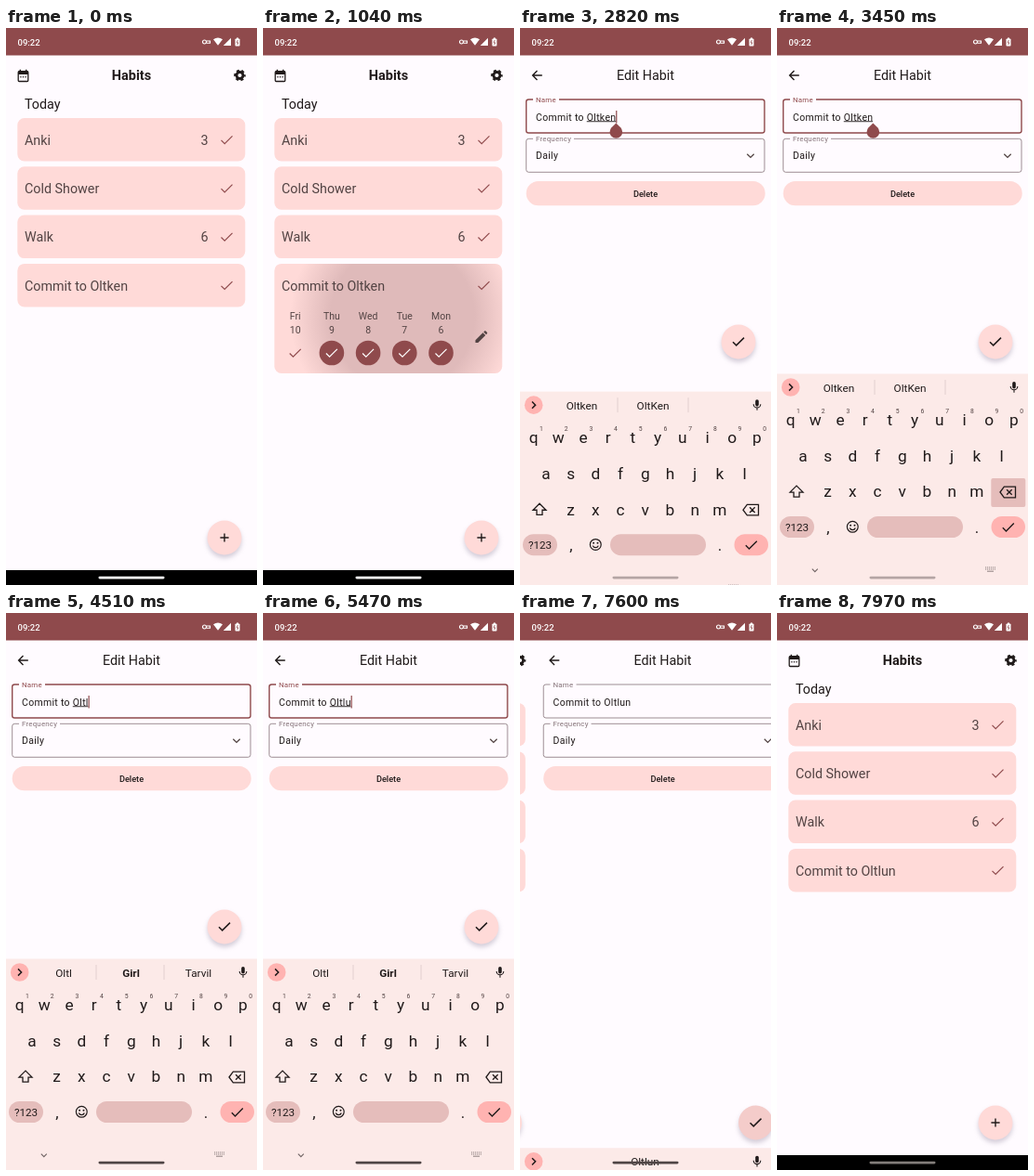
Animation, 270 px wide and 600 px high, one loop 7990 ms. Source, as an HTML page:

```html
<!DOCTYPE html>
<html lang="en">
<head>
<meta charset="utf-8">
<title>Habit tracker</title>
<style>
html, body { margin: 0; width: 100%; height: 100%; overflow: hidden; background: #fffbff; }
svg { display: block; width: 100vw; height: 100vh; }
text { font-family: Roboto, "Noto Sans", sans-serif; white-space: pre; }
.line { fill: none; stroke-linecap: butt; stroke-linejoin: miter; }
</style>
</head>
<body>
<svg id="stage" viewBox="0 0 270 600"></svg>
<script>
const LOOP = 7990;
const C = {
  page: '#fffbff', bar: '#8f4a4c', card: '#ffdad8', ink: '#201a1a', text: '#524343',
  outline: '#857378', keys: '#fceae8', pink: '#e5bdbb', coral: '#ffb3b1', light: '#ffffff', shadow: '#aaa0b4'
};
const OLD = 'Oltken', NEW = 'Oltlun';

const text = (x, cy, size, str, { fill = C.ink, anchor = 'start', weight = 400, extra = '' } = {}) =>
  `<text x="${x}" y="${cy + size * .355}" font-size="${size}" fill="${fill}" text-anchor="${anchor}" font-weight="${weight}" ${extra}>${str}</text>`;
const mid = (x, cy, size, str, opts = {}) => text(x, cy, size, str, { ...opts, anchor: 'middle' });
const rect = (x, y, w, h, r, fill, extra = '') =>
  `<rect x="${x}" y="${y}" width="${w}" height="${h}" rx="${r}" fill="${fill}" ${extra}/>`;
const line = (d, color = C.ink, width = 1.4, extra = '') =>
  `<path class="line" d="${d}" stroke="${color}" stroke-width="${width}" ${extra}/>`;
const at = (x, y, content, id = '') => `<g ${id && `id="${id}"`} transform="translate(${x} ${y})">${content}</g>`;
const disc = (r, fill, extra = '') => `<circle r="${r}" fill="${fill}" ${extra}/>`;
const check = (x, y, color = C.bar, width = 1.2) => at(x, y, line('M-6 .2L-2.3 3.9L6 -4.4', color, width));

// Icons, centred on their own origin
const gear = disc(3.5, 'none', `stroke="${C.ink}" stroke-width="2.8"`) +
  disc(5.2, 'none', `stroke="${C.ink}" stroke-width="2.2" stroke-dasharray="2.9 2.545" stroke-dashoffset="1.45"`);
const calendar = rect(-5.3, -4.8, 10.6, 10.8, 1, 'none', `stroke="${C.ink}" stroke-width="1.3"`) +
  rect(-5.5, -5, 11, 3.4, .6, C.ink) + line('M-3.2 -6.8v2.5M3.2 -6.8v2.5') +
  [-2.6, 0, 2.6].map(x => rect(x - .65, .6, 1.3, 1.3, 0, C.ink)).join('');
const arrow = line('M5.3 0H-4.4M0 -4.9L-4.9 0L0 4.9');
const pencil = `<path d="M-6 6V3.2L2 -4.8L4.8 -2L-3.2 6ZM2.8 -5.6L4 -6.7Q4.6 -7 5.2 -6.5L6.6 -5Q7 -4.4 6.6 -3.9L5.6 -2.8Z" fill="${C.text}"/>`;
const fab = (icon, id) => at(235, 549,
  disc(18.5, C.shadow, 'cy="3.5" opacity=".5" filter="url(#soft)"') + disc(18.5, C.card) +
  disc(18.5, C.bar, 'class="tap" opacity="0"') + icon, id);

const statusBar = rect(0, 0, 270, 29.5, 0, C.bar) +
  text(12.5, 15.5, 9.5, '09:22', { fill: C.light, weight: 500 }) +
  at(213.5, 15, disc(2, 'none', `stroke="${C.light}" stroke-width="1.2"`) + line('M2 -1H6V1.2H2', C.light, 1.1)) +
  `<g fill="${C.light}"><path d="M223 12.3Q228 8.6 233 12.3L228 18.8Z"/><path d="M234 19V18.7L242 10.8V19Z"/></g>` +
  rect(246.5, 11.5, 5, 8, .8, C.light) + rect(248, 10.5, 2, 1.5, 0, C.light) + line('M249.3 13L248.2 15.8H249.8L248.8 18', C.bar, .8);

const habits = [['Anki', 3], ['Cold Shower', ''], ['Walk', 6], ['', '']];
const cardTop = i => 97 + i * 52.3;
const card = ([name, count], i) => {
  const y = cardTop(i), cy = y + 23.7, last = i === 3;
  return rect(12.3, y, 245, 46.5, 7.5, C.card, last ? 'id="lastCard"' : '') +
    (last ? '<g clip-path="url(#cardClip)"><circle id="ripple" cx="150" cy="311" fill="url(#glow)"/></g>' : '') +
    text(20, cy, 14.3, name, { fill: C.text, extra: last ? 'id="lastName"' : '' }) +
    mid(213.5, cy, 14.3, count, { fill: C.text }) + check(237.5, cy);
};
const days = ['Fri', 'Thu', 'Wed', 'Tue', 'Mon'].map((day, i) => {
  const x = 34.7 + i * 39.2, opts = { fill: C.text };
  return mid(x, 310, 10.5, day, opts) + mid(x, 325.5, 10.5, 10 - i, opts) +
    (i ? at(x, 350, disc(13.3, C.bar)) : '') + check(x, 350.3, i ? C.light : C.bar);
}).join('');

const home = rect(0, 29, 270, 555, 0, C.page) + at(18.5, 51.5, calendar) +
  mid(135, 51, 14.5, 'Habits', { weight: 700 }) + at(251.5, 51, gear) +
  text(20, 82, 14.3, 'Today') + habits.map(card).join('') +
  `<g id="details">${days}${at(234.5, 333, disc(16, C.bar, 'id="editTap" opacity="0"') + pencil)}</g>` +
  fab(line('M-4.6 0H4.6M0 -4.6V4.6'), 'homeFab');

const field = (y, label, labelWidth, id) =>
  rect(6.7, y, 256.3, 36, 2.6, C.page, `id="${id}" stroke="${C.outline}" stroke-width=".8"`) +
  rect(14, y - 3, labelWidth + 6, 6, 0, C.page) +
  text(17, y, 7.9, label, { fill: C.outline, extra: `id="${id}Label" letter-spacing=".2"` });

const edit = rect(0, 29, 270, 555, 0, C.page) + at(18.5, 51, arrow) +
  mid(135, 51, 14.3, 'Edit Habit') +
  field(77, 'Name', 22, 'name') + text(17, 96, 10.5, '', { extra: 'id="input" letter-spacing=".3"' }) +
  rect(0, 100.3, 0, .9, 0, C.ink, 'id="underline"') + rect(0, 89, 1.2, 13.5, 0, C.bar, 'id="caret"') +
  `<path id="handle" d="M0 102.5L4.9 107.3A6.8 6.8 0 1 1 -4.9 107.3Z" fill="${C.bar}"/>` +
  field(119.3, 'Frequency', 38, 'freq') + text(17, 137, 10.5, 'Daily', { extra: 'letter-spacing=".3"' }) +
  line('M244.3 135.7L248 139.4L251.7 135.7', C.text, 1.3) +
  rect(6.7, 165, 257, 26.3, 13.1, C.card) + mid(135, 178.3, 9.2, 'Delete', { weight: 500 }) +
  fab(line('M-6 .2L-2.3 3.9L6 -4.4', C.ink, 1.5), 'saveFab');

const keyX = (col, shift) => 14.6 + 26.7 * (col + shift);
const keyRow = (letters, y, shift) => [...letters].map((k, i) => mid(keyX(i, shift), y, 17.3, k)).join('');
const keyboard = rect(0, 372.5, 270, 228, 0, C.keys) +
  at(14.7, 387, disc(9.8, C.coral) + line('M-1.7 -3.6L1.9 0L-1.7 3.6', C.ink, 1.5)) +
  '<g id="suggestions"></g>' +
  at(255, 387, rect(-1.8, -6, 3.6, 7.5, 1.8, C.ink) + line('M-3.8 -1A3.8 3.8 0 0 0 3.8 -1M0 3V5.7', C.ink, 1.1)) +
  '<g id="pressed"></g>' +
  keyRow('qwertyuiop', 422, 0) + keyRow('asdfghjkl', 461, .5) + keyRow('zxcvbnm', 499.3, 1.5) +
  [...'1234567890'].map((n, i) => mid(keyX(i, 0) + 8.3, 412.5, 6.8, n, { fill: C.text })).join('') +
  at(21, 499.5, line('M0 -6.4L-7 .6H-3V5.7H3V.6H7Z', C.ink, 1.3)) +
  at(248.5, 500, line('M-8.5 0L-4.2 -5.8H8V5.8H-4.2ZM-1.4 -2.8L4.2 2.8M4.2 -2.8L-1.4 2.8', C.ink, 1.3)) +
  rect(3, 526, 37, 23, 11.5, C.pink) + mid(21.5, 537.7, 11.7, '?123') +
  mid(55, 538, 17, ',') + mid(215, 538, 17, '.') +
  at(81.3, 537.3, disc(5.9, 'none', `stroke="${C.ink}" stroke-width="1.2"`) +
    disc(1, C.ink, 'cx="-2.2" cy="-1.6"') + disc(1, C.ink, 'cx="2.2" cy="-1.6"') + line('M-3 1.2A3.2 3.2 0 0 0 3 1.2', C.ink, 1.3)) +
  rect(97, 526, 103, 23, 11.5, C.pink) + rect(230.5, 526, 36.5, 23, 11.5, C.coral) + check(248.8, 538, C.ink, 1.4) +
  line('M37.8 582.6L40.8 585.6L43.8 582.6', '#6f6363', 1.1) +
  line('M224 581H235M224 583H235', '#8d8080', 1, 'stroke-dasharray="1.2 .8"') + line('M226 585.2H233', '#8d8080', 1);

document.getElementById('stage').innerHTML = `
  <defs>
    <filter id="soft" x="-50%" y="-50%" width="200%" height="200%"><feGaussianBlur stdDeviation="2.6"/></filter>
    <clipPath id="cardClip">${rect(12.3, cardTop(3), 245, 46.5, 7.5, '#000', 'id="clipRect"')}</clipPath>
    <radialGradient id="glow"><stop offset=".64" stop-color="#dfbaba"/>
      <stop offset="1" stop-color="#dfbaba" stop-opacity="0"/></radialGradient>
  </defs>
  <rect width="270" height="600" fill="${C.page}"/>
  <g id="home">${home}</g><g id="edit">${edit}</g>
  ${statusBar}${rect(0, 584, 270, 16, 0, '#000')}
  <g id="keyboard">${keyboard}</g>${rect(99.5, 590.8, 71, 2.6, 1.3, C.light, 'id="pill"')}`;

const $ = Object.fromEntries([...document.querySelectorAll('[id]')].map(el => [el.id, el]));
const set = (el, attrs) => { for (const k in attrs) el.setAttribute(k, attrs[k]); };
const show = (el, on) => set(el, { visibility: on ? 'visible' : 'hidden' });

// Each table row starts at its first value, in milliseconds
const words = [[0, OLD], [3480, 'Oltke'], [3700, 'Oltk'], [3920, 'Olt'], [4250, 'Oltl'], [5210, 'Oltlu'], [5780, NEW]];
const hints = [
  [0, [[66.5, OLD], [143, 'OltKen']], [105, 181]],
  [3720, [[62, 'Olt'], [134.5, 'Old', 1], [207, 'Out']], [97, 170]],
  [4300, [[62, 'Oltl'], [134.5, 'Girl', 1], [207, 'Tarvil']], [97, 170]],
  [5800, [[134.5, NEW]], []]
];
const presses = [
  ...[3410, 3640, 3860].map(t => [t, 230.3, 485, 37]),
  [4180, 230, 446, 24], [5130, 16, 446, 24], [5710, 149.5, 485, 24]
];
const FOCUS = 2480, KEYS_UP = 2630, KEYS_DOWN = 7420, SLIDE_IN = 1500, SLIDE_OUT = 7540;

const current = (rows, t) => rows.filter(row => row[0] <= t).pop();
const ramp = (t, start, length) => Math.min(1, Math.max(0, (t - start) / length));
const pulse = (t, start, length) => Math.sin(Math.PI * ramp(t, start, length)) * .2;

// cubic-bezier(.4, 0, .2, 1), solved by bisection
function standard(p) {
  let low = 0, high = 1;
  for (let i = 0; i < 16; i++) {
    const u = (low + high) / 2, v = 1 - u;
    if (1.2 * u * v * v + .6 * u * u * v + u ** 3 < p) low = u; else high = u;
  }
  return high * high * (3 - 2 * high);
}

let shownHint;

function drawHome(t) {
  const open = t >= 930 && t < KEYS_DOWN;
  const height = open ? 118 : 46.5;
  set($.lastCard, { height });
  set($.clipRect, { height });
  show($.details, open);
  $.lastName.textContent = 'Commit to ' + (t < KEYS_DOWN ? OLD : NEW);
  const spread = 1 - (1 - ramp(t, 830, 450)) ** 1.3;
  set($.ripple, { r: 20 + 180 * spread, opacity: t < 830 ? 0 : 1 - ramp(t, 1240, 360) });
  set($.editTap, { opacity: pulse(t, 1370, 300) });
}

function drawInput(t) {
  const [since, word] = current(words, t);
  const focused = t >= FOCUS && t < SLIDE_OUT;
  const color = focused ? C.bar : C.outline;
  $.input.textContent = 'Commit to ' + word;
  const start = 17 + $.input.getSubStringLength(0, 10);
  const end = 17 + $.input.getComputedTextLength();
  const blinkFrom = Math.max(since, FOCUS);
  set($.name, { stroke: color, 'stroke-width': focused ? 1.4 : .8 });
  set($.nameLabel, { fill: color });
  set($.underline, { x: start, width: end - start - .3 });
  set($.caret, { x: end - .2 });
  set($.handle, { transform: `translate(${end} 0)` });
  show($.underline, focused);
  show($.caret, focused && (t - blinkFrom) % 1000 < 500);
  show($.handle, t >= FOCUS && t < words[1][0]);
}

function drawKeyboard(t) {
  const up = standard(ramp(t, KEYS_UP, 290)) - standard(ramp(t, KEYS_DOWN, 290));
  set($.keyboard, { transform: `translate(0 ${228 * (1 - up)})` });
  show($.keyboard, up > 0);
  // The page is laid out anew as soon as the keyboard starts to move
  const resized = t >= KEYS_UP && t < KEYS_DOWN;
  set($.saveFab, { transform: `translate(235 ${resized ? 338 : 549})` });
  set($.saveFab.querySelector('.tap'), { opacity: pulse(t, 7300, 360) });
  set($.pill, { fill: up > .1 ? (t < 3600 ? '#b5a5a4' : '#4f4545') : t > KEYS_DOWN ? '#827d7a' : C.light });

  const hint = current(hints, t);
  if (hint !== shownHint) {
    shownHint = hint;
    $.suggestions.innerHTML =
      hint[1].map(([x, word, bold]) => mid(x, 387.5, 11.8, word, { weight: bold ? 700 : 400 })).join('') +
      hint[2].map(x => line(`M${x} 379V395`, '#dccac9', .8)).join('');
  }
  $.pressed.innerHTML = presses.filter(([from]) => t >= from && t < from + 110)
    .map(([, x, y, w]) => rect(x, y, w, 31, 2, C.pink)).join('');
}

function draw(t) {
  const slide = standard(ramp(t, SLIDE_IN, 400)) - standard(ramp(t, SLIDE_OUT, 400));
  set($.home, { transform: `translate(${-270 * slide} 0)` });
  set($.edit, { transform: `translate(${270 * (1 - slide)} 0)` });
  drawHome(t);
  drawInput(t);
  drawKeyboard(t);
}

const begin = performance.now();
function tick() {
  draw((performance.now() - begin) % LOOP);
  requestAnimationFrame(tick);
}
tick();
</script>
</body>
</html>
```
